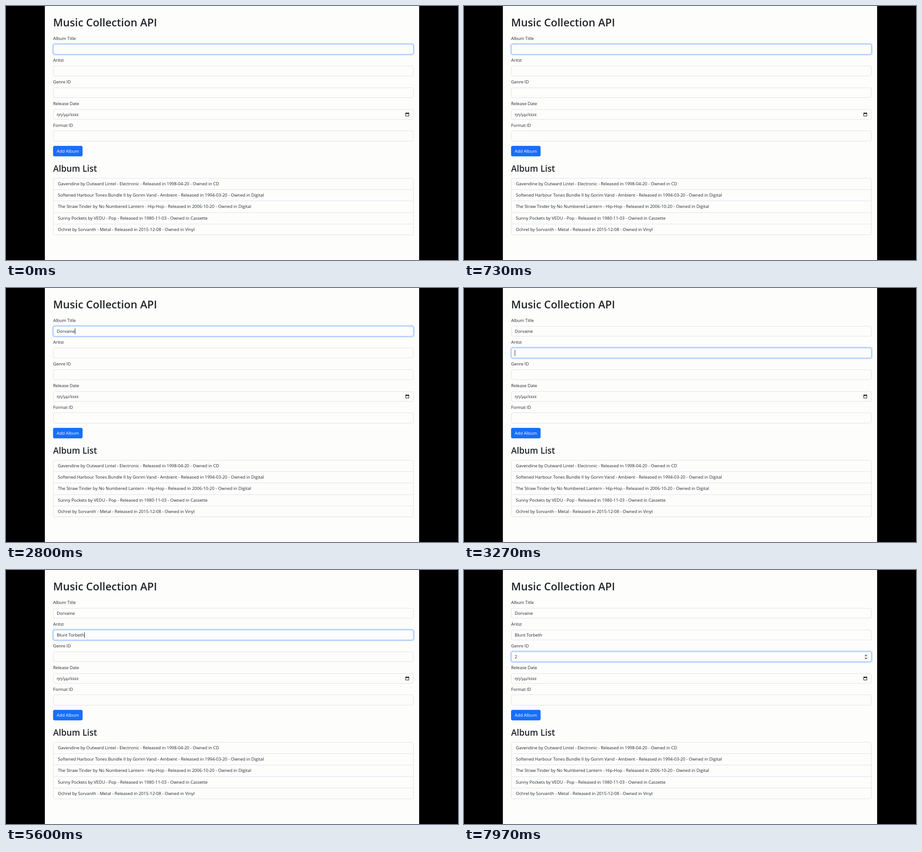
These frames come from a looping animation (998 by 561 pixels, 8 s). An HTML page:

```html
<!DOCTYPE html>
<html lang="en">
<head>
<meta charset="utf-8">
<title>Music Collection API</title>
<style>
  html, body { margin: 0; width: 100%; height: 100%; overflow: hidden; background: #000; }
  #stage { position: relative; width: 998px; height: 561px; overflow: hidden; background: #000;
    color: #212529; font: 9.5px/14px "Open Sans", "Noto Sans", sans-serif; }
  #page { position: absolute; left: 86px; top: 0; width: 825.5px; height: 561px;
    background: #fdfdfc; box-shadow: 0 0 1px #fdfdfc; }
  #stage div, #stage svg { position: absolute; box-sizing: border-box; white-space: pre; }
  .heading { left: 104px; font-weight: 600; line-height: 30px; }
  .label { left: 104px; }
  .input { left: 104px; width: 796px; height: 23.6px; border: 1px solid #dee2e6; border-radius: 4px; }
  .ring { left: 104px; width: 796px; height: 23.6px; border: 1px solid #98c1fb; border-radius: 4px;
    box-shadow: 0 0 1px 2px rgba(13, 110, 253, .23); opacity: 0; }
  .value { left: 112px; }
  .caret { display: inline-block; width: 1px; height: 13px; margin-right: -1px;
    vertical-align: -3px; background: #212529; visibility: hidden; }
  .button { left: 104px; top: 308.8px; width: 65px; height: 23.4px; border-radius: 4px;
    background: #176ffa; box-shadow: 0 0 1px #176ffa; color: #fff; line-height: 23.4px; text-align: center; }
  .list { left: 104px; top: 380px; width: 796px; height: 126.4px; border: 1px solid #dee2e6; border-radius: 4px; }
  .rule { left: 104px; width: 796px; height: 1px; background: #dee2e6; }
  .item { left: 114.5px; }
</style>
</head>
<body>
<div id="stage">
  <div id="page"></div>
  <div class="heading" style="top:21px;font-size:23.65px">Music Collection API</div>
  <div class="button">Add Album</div>
  <div class="heading" style="top:344px;font-size:18.95px">Album List</div>
  <div class="list"></div>
  <svg style="left:881px;top:234px" width="10" height="11">
    <path d="M1.5 2.5h7v6.6h-7z" fill="none" stroke="#111"/>
    <path d="M1 2h8v2.2H1zM2.3 1h1v1h-1zM6.7 1h1v1h-1z" fill="#111"/>
  </svg>
  <svg id="spinner" style="left:883px;top:185px" width="9" height="14">
    <path d="M0 0h9v14H0z" fill="#f0f0f0"/>
    <path d="M2 5l2.5-3L7 5zM2 9l2.5 3L7 9z" fill="#444"/>
  </svg>
</div>
<script>
const LOOP = 8000, BLINK = 530, FADE = 150, STEP = 47.9;
const stage = document.getElementById('stage');
const spinner = document.getElementById('spinner');

// keys: the time at which each character of the text appears
const fields = [
  { label: 'Album Title', text: 'Dorvaine', from: -860, to: 3010,
    keys: [1850, 1960, 2090, 2200, 2320, 2440, 2540, 2650] },
  { label: 'Aritst', text: 'Blunt Torbeth', from: 3010, to: 6650,
    keys: [3800, 3920, 4040, 4180, 4290, 4400, 4560, 4740, 4880, 5020, 5200, 5330, 5480] },
  { label: 'Genre ID', text: '2', from: 6650, to: Infinity, keys: [7210] },
  { label: 'Release Date', text: 'ηη/μμ/εεεε' },
  { label: 'Format ID', text: '' }
];

const albums = [
  'Gavendine by Outward Lintel - Electronic - Released in 1998-04-20 - Owned in CD',
  'Softened Harbour Tones Bundle II by Gorim Vand - Ambient - Released in 1994-03-20 - Owned in Digital',
  'The Straw Tinder by No Numbered Lantern - Hip-Hop - Released in 2006-10-20 - Owned in Digital',
  'Sunny Pockets by VEDU - Pop - Released in 1980-11-03 - Owned in Cassette',
  'Ochrel by Sorvanth - Metal - Released in 2015-12-08 - Owned in Vinyl'
];

function add(className, top, text = '') {
  const el = document.createElement('div');
  el.className = className;
  el.style.top = top + 'px';
  el.textContent = text;
  stage.append(el);
  return el;
}

fields.forEach((field, i) => {
  const y = i * STEP;
  add('label', 65 + y, field.label);
  add('input', 83.8 + y);
  const value = add('value', 89 + y, field.text);
  if (!field.keys) return;
  field.ring = add('ring', 83.8 + y);
  field.typed = document.createElement('span');
  field.caret = document.createElement('span');
  field.caret.className = 'caret';
  value.replaceChildren(field.typed, field.caret);
});

albums.forEach((album, i) => {
  if (i) add('rule', 380 + i * 25.2);
  add('item', 386 + i * 25.2, album);
});
stage.append(spinner);

function ease(x) {
  x = Math.min(1, Math.max(0, x));
  return x * x * (3 - 2 * x);
}

function render(t) {
  for (const field of fields) {
    if (!field.keys) continue;
    const { from, to, keys, text } = field;
    const count = keys.filter(key => key <= t).length;
    const touched = count ? keys[count - 1] : from;
    const caretOn = t >= from && t < to && Math.floor((t - touched) / BLINK) % 2 === 0;
    const shown = text.slice(0, count);
    if (field.typed.textContent !== shown) field.typed.textContent = shown;
    field.caret.style.visibility = caretOn ? 'visible' : 'hidden';
    field.ring.style.opacity = ease((t - from) / FADE) * (1 - ease((t - to) / FADE));
  }
  spinner.style.visibility = t >= fields[2].from ? 'visible' : 'hidden';
}

const start = performance.now();
function tick() {
  render((performance.now() - start) % LOOP);
  requestAnimationFrame(tick);
}
tick();
</script>
</body>
</html>
```
